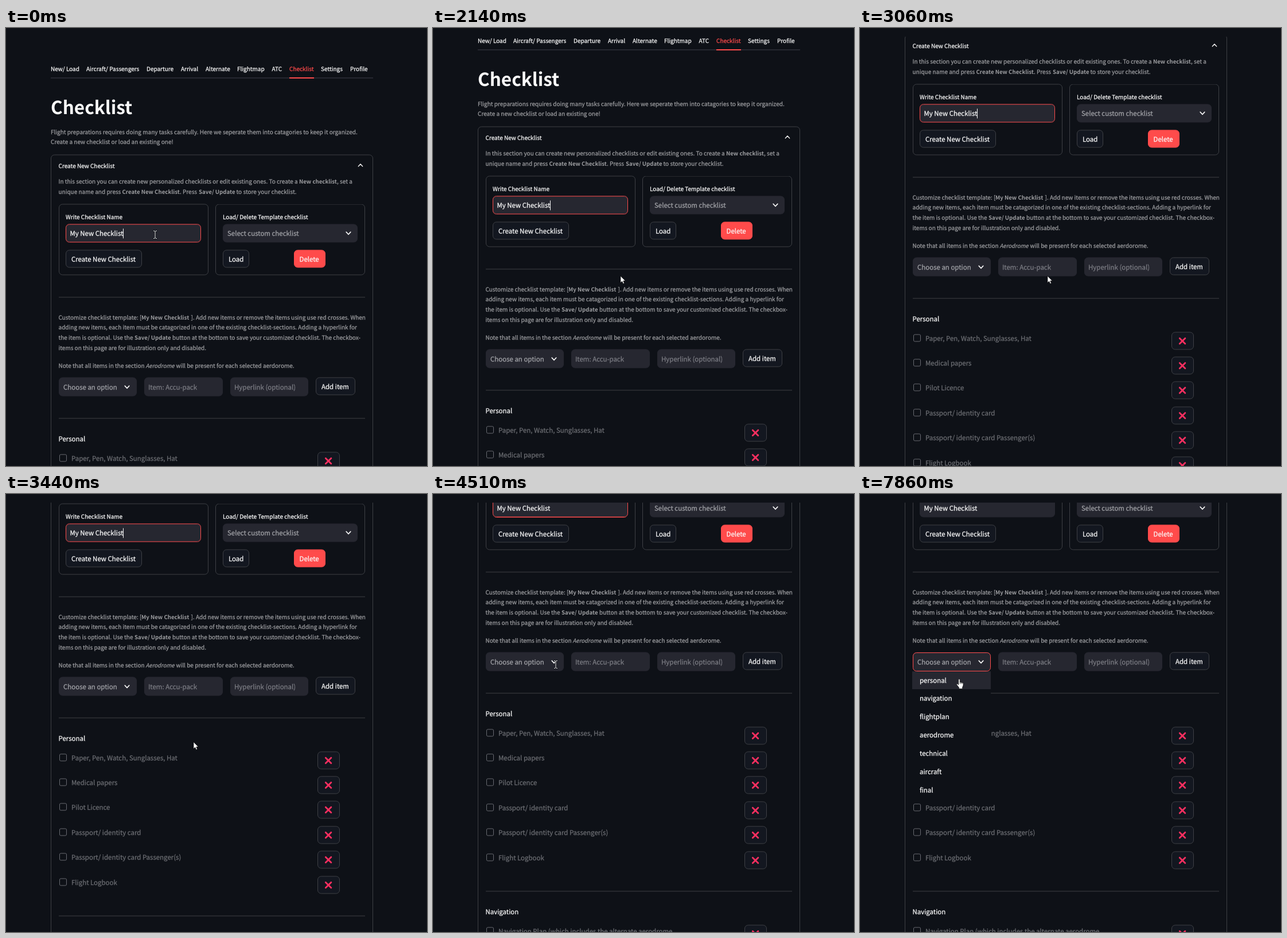
Recreate the animation shown at these times as an HTML page. Size 734x763 px, loop 8000 ms.

```html
<!DOCTYPE html>
<html lang="en">
<head>
<meta charset="utf-8">
<title>Checklist</title>
<style>
html, body { margin: 0; width: 100%; height: 100%; overflow: hidden; background: #0e1117; }
svg { display: block; width: 734px; height: 763px; }
text {
  font: 11.46px "Noto Sans CJK JP", "Noto Sans CJK SC", "Noto Sans CJK KR", "Noto Sans CJK", "Noto Sans", sans-serif;
  color: #fafafa; fill: currentColor; stroke: currentColor; stroke-width: .25;
  text-rendering: geometricPrecision; white-space: pre;
}
.small, .note { font-size: 10.01px; }
.title { font-size: 31.5px; font-weight: 700; stroke: none; }
.note, .strong, .em { color: #9c9da0; }
.strong { font-size: 9.7px; font-weight: 700; stroke: none; }
.em { font-size: 9.6px; font-style: italic; }
.red { color: #ff4b4b; }
.hint { color: #a3a4a9; }
.faint { color: #7c7d84; }
.off { color: #6c6e73; }
.frame { fill: none; stroke: #3e4045; }
.button { fill: #131720; stroke: #3e4045; }
.danger { fill: #ff4b4b; stroke: #ff4b4b; }
.field { fill: #262730; stroke: #262730; }
.active { fill: none; stroke: #ff4b4b; }
.box { fill: none; stroke: #686a71; }
.rule { stroke: #3e4045; }
.chevron { fill: none; stroke: #fafafa; stroke-linecap: round; stroke-linejoin: round; }
.cross { fill: none; stroke: #f92f60; stroke-width: 2.8; stroke-linecap: round; }
.caret { fill: #fafafa; }

#page, #pointer, #focus, #menu, #caret, #menuCaret, #beam, #arrow, #hand {
  animation: 8s step-end infinite;
}
#page { animation-name: scroll; }
#pointer { animation-name: move; }
#focus { animation-name: blur; }
#menu { animation-name: open; }
#caret { animation-name: blink; }
#menuCaret { animation-name: menuBlink; }
#beam { animation-name: beam; }
#arrow { animation-name: arrow; }
#hand { animation-name: hand; }

@keyframes scroll {
  0% { transform: translateY(0); }
  25% { transform: translateY(-11px); }
  26.75% { transform: translateY(-49px); }
  28.625% { transform: translateY(-92px); }
  30.25% { transform: translateY(-118px); }
  36.75% { transform: translateY(-153px); }
  38.25% { transform: translateY(-209px); }
  39.75% { transform: translateY(-256px); }
  41.5% { transform: translateY(-290px); }
  43.25% { transform: translateY(-313px); }
  44.875% { transform: translateY(-326px); }
  46.625% { transform: translateY(-332px); }
  48.375%, 100% { transform: translateY(-333px); }
}
@keyframes move {
  0% { transform: translate(260px, 360px); }
  8.5% { transform: translate(262px, 363px); }
  10.25% { transform: translate(266px, 369px); }
  13.625% { transform: translate(294px, 388px); }
  15.25% { transform: translate(317px, 404px); }
  16.75% { transform: translate(323px, 419px); }
  18.5% { transform: translate(326px, 428px); }
  20.125% { transform: translate(327px, 432px); }
  49.875% { transform: translate(318px, 420px); }
  51.5% { transform: translate(288px, 378px); }
  53.125% { transform: translate(250px, 335px); }
  54.75% { transform: translate(225px, 310px); }
  56.375% { transform: translate(214px, 297px); }
  59.625% { transform: translate(212px, 294px); }
  74.625% { transform: translate(210px, 298px); }
  76.25% { transform: translate(203px, 305px); }
  78.125% { transform: translate(185px, 319px); }
  80% { transform: translate(179px, 321px); }
  81.75%, 100% { transform: translate(173px, 322px); }
}
@keyframes blur { 0% { opacity: 1; } 58%, 100% { opacity: 0; } }
@keyframes open { 0% { opacity: 0; } 58%, 100% { opacity: 1; } }
@keyframes blink {
  0%, 10.25%, 25%, 36.75% { opacity: 1; }
  3.5%, 16.75%, 30.25%, 43.375%, 100% { opacity: 0; }
}
@keyframes menuBlink {
  0%, 58%, 71.125%, 85.125% { opacity: 1; }
  64.375%, 78.125%, 91.75%, 100% { opacity: 0; }
}
@keyframes beam { 0%, 56.375% { opacity: 1; } 13.625%, 78.125%, 100% { opacity: 0; } }
@keyframes arrow { 0%, 56.375%, 100% { opacity: 0; } 13.625% { opacity: 1; } }
@keyframes hand { 0% { opacity: 0; } 78.125%, 100% { opacity: 1; } }
</style>
</head>
<body>
<svg viewBox="0 0 734 763">
  <clipPath id="view"><rect y="15" width="734" height="748"/></clipPath>
  <g clip-path="url(#view)"><g transform="translate(0 -.5)"><g id="page"></g></g></g>
  <g id="menu"></g>
  <g id="pointer">
    <g id="beam" fill="none" stroke-linecap="square">
      <path d="M-2.5-6.5H-1L0-5.5 1-6.5H2.5M0-5.5V5.5M-2.5 6.5H-1L0 5.5 1 6.5H2.5" stroke="#0e1117" stroke-width="2.4"/>
      <path d="M-2.5-6.5H-1L0-5.5 1-6.5H2.5M0-5.5V5.5M-2.5 6.5H-1L0 5.5 1 6.5H2.5" stroke="#eee"/>
    </g>
    <path id="arrow" d="M0 0V11.8L2.7 9.3 4.6 13.4 6.5 12.6 4.7 8.6H8.3Z" fill="#fff" stroke="#000" stroke-width=".6"/>
    <g id="hand" stroke="#000" stroke-width=".6">
      <path d="M-1.2 1.2Q0-.5 1.2 1.2V5.8L5.8 6.8Q7.2 7.2 7.1 8.6L6.8 12 5.6 14.6V17.2H-.4V15.2L-4.3 10.3Q-4.8 8.5-3.2 8.6L-1.2 10.4Z" fill="#fff"/>
      <path d="M1.2 5.8V9M3.2 6.3V9M5.2 6.8V9" fill="none"/>
    </g>
  </g>
</svg>
<script>
const text = (x, y, str, cls = "") => `<text x="${x}" y="${y}" class="${cls}">${str}</text>`;
const rect = (x1, y1, x2, y2, cls, r = 6) =>
  `<rect x="${x1 + .5}" y="${y1 + .5}" width="${x2 - x1 - 1}" height="${y2 - y1 - 1}" rx="${r}" class="${cls}"/>`;
const rule = y => `<path d="M92 ${y + .5}H626" class="rule"/>`;
const chevron = (x, y, dir = 1, width = 1.8) =>
  `<path d="M${x - 3.7} ${y - 2 * dir}l3.7 ${4 * dir} 3.7 ${-4 * dir}" stroke-width="${width}" class="chevron"/>`;
const button = (x1, y1, x2, y2, label, tx, cls = "button") =>
  rect(x1, y1, x2, y2, cls) + text(tx, y1 + 20, label);

const item = (label, y) =>
  rect(93, y - 7, 106, y + 6, "box", 2) +
  text(114, y + 4.5, label, "off") +
  rect(543, y - 11, 582, y + 20, "button") +
  `<path d="M557.3 ${y}l9.6 9.6m0-9.6l-9.6 9.6" class="cross"/>`;

const section = (y, title, items) =>
  rule(y) + text(91.5, y + 40.5, title) +
  items.map((label, i) => item(label, Math.round(y + 69.6 + i * 43.4))).join("");

const tabs = [["New/ Load", 78], ["Aircraft/ Passengers", 140], ["Departure", 245], ["Arrival", 305],
  ["Alternate", 348], ["Flightmap", 403], ["ATC", 463.5], ["Checklist", 494], ["Settings", 549], ["Profile", 600]];

page.innerHTML = [
  ...tabs.map(([label, x]) => text(x, 75, label, label === "Checklist" ? "small red" : "small")),
  `<path d="M78 87.5H640" stroke="#262730" stroke-width="2"/>`,
  `<path d="M494 87.5H537" stroke="#ff4b4b" stroke-width="2"/>`,
  text(78, 150, "Checklist", "title"),
  text(78, 185, "Flight preparations requires doing many tasks carefully. Here we seperate them into catagories to keep it organized.", "note"),
  text(78, 202.5, "Create a new checklist or load an existing one!", "note"),

  rect(78, 221, 640, 1400, "frame"),
  text(91.5, 244, "Create New Checklist", "small"),
  chevron(618, 239.5, -1, 1.3),
  text(91.5, 271.5, "In this section you can create new personalized checklists or edit existing ones. To create a", "note"),
  text(511, 271.5, "New checklist", "strong"),
  text(577, 271.5, ", set a", "note"),
  text(91.5, 289, "unique name and press", "note"),
  text(202.5, 289, "Create New Checklist", "strong"),
  text(303, 289, ". Press", "note"),
  text(336, 289, "Save/ Update", "strong"),
  text(401.5, 289, "to store your checklist.", "note"),

  rect(92, 307, 353, 431, "frame"),
  text(104, 333, "Write Checklist Name", "small"),
  rect(104, 342, 340, 374, "field"),
  `<g id="focus">${rect(104, 342, 340, 374, "active")}</g>`,
  text(111.5, 362.5, "My New Checklist"),
  `<rect id="caret" x="204" y="350" width="1" height="17" class="caret"/>`,
  button(104, 387, 237, 418, "Create New Checklist", 114),

  rect(365, 307, 626, 431, "frame"),
  text(378, 333, "Load/ Delete Template checklist", "small"),
  rect(378, 342, 613, 374, "field"),
  text(386, 362.5, "Select custom checklist", "hint"),
  chevron(597, 358),
  button(378, 387, 424, 418, "Load", 388),
  button(502, 387, 557, 418, "Delete", 511.5, "danger"),

  rule(469),
  text(91.5, 508, "Customize checklist template: [", "note"),
  text(236, 508, "My New Checklist", "strong"),
  text(322.5, 508, "]. Add new items or remove the items using use red crosses. When", "note"),
  text(91.5, 525.5, "adding new items, each item must be catagorized in one of the existing checklist-sections. Adding a hyperlink for", "note"),
  text(91.5, 543, "the item is optional. Use the", "note"),
  text(224, 543, "Save/ Update", "strong"),
  text(290, 543, "button at the bottom to save your customized checklist. The checkbox-", "note"),
  text(91.5, 561.5, "items on this page are for illustration only and disabled.", "note"),
  text(91.5, 592, "Note that all items in the section", "note"),
  text(243.5, 592, "Aerodrome", "em"),
  text(296.5, 592, "will be present for each selected aerdorome.", "note"),

  rect(92, 609, 228, 642, "field"),
  text(100, 630, "Choose an option", "hint"),
  chevron(211, 626),
  rect(241, 609, 378, 642, "field"),
  text(248, 630, "Item: Accu-pack", "faint"),
  rect(391, 609, 527, 642, "field"),
  text(398, 630, "Hyperlink (optional)", "faint"),
  button(540, 609, 609, 640, "Add item", 550),

  section(680, "Personal", ["Paper, Pen, Watch, Sunglasses, Hat", "Medical papers", "Pilot Licence",
    "Passport/ identity card", "Passport/ identity card Passenger(s)", "Flight Logbook"]),
  section(1025, "Navigation", ["Navigation Plan (which includes the alternate aerodrome"])
].join("");

const options = ["personal", "navigation", "flightplan", "aerodrome", "technical", "aircraft", "final"];
menu.innerHTML = [
  rect(92, 276, 228, 309, "active"),
  `<rect id="menuCaret" x="99" y="285" width="1" height="16" class="caret"/>`,
  `<rect x="91" y="309" width="137" height="224" fill="#0e1117"/>`,
  `<rect x="91" y="309" width="137" height="31" fill="#262730"/>`,
  ...options.map((label, i) => text(104, 328.5 + i * 31.9, label))
].join("");
</script>
</body>
</html>
```
